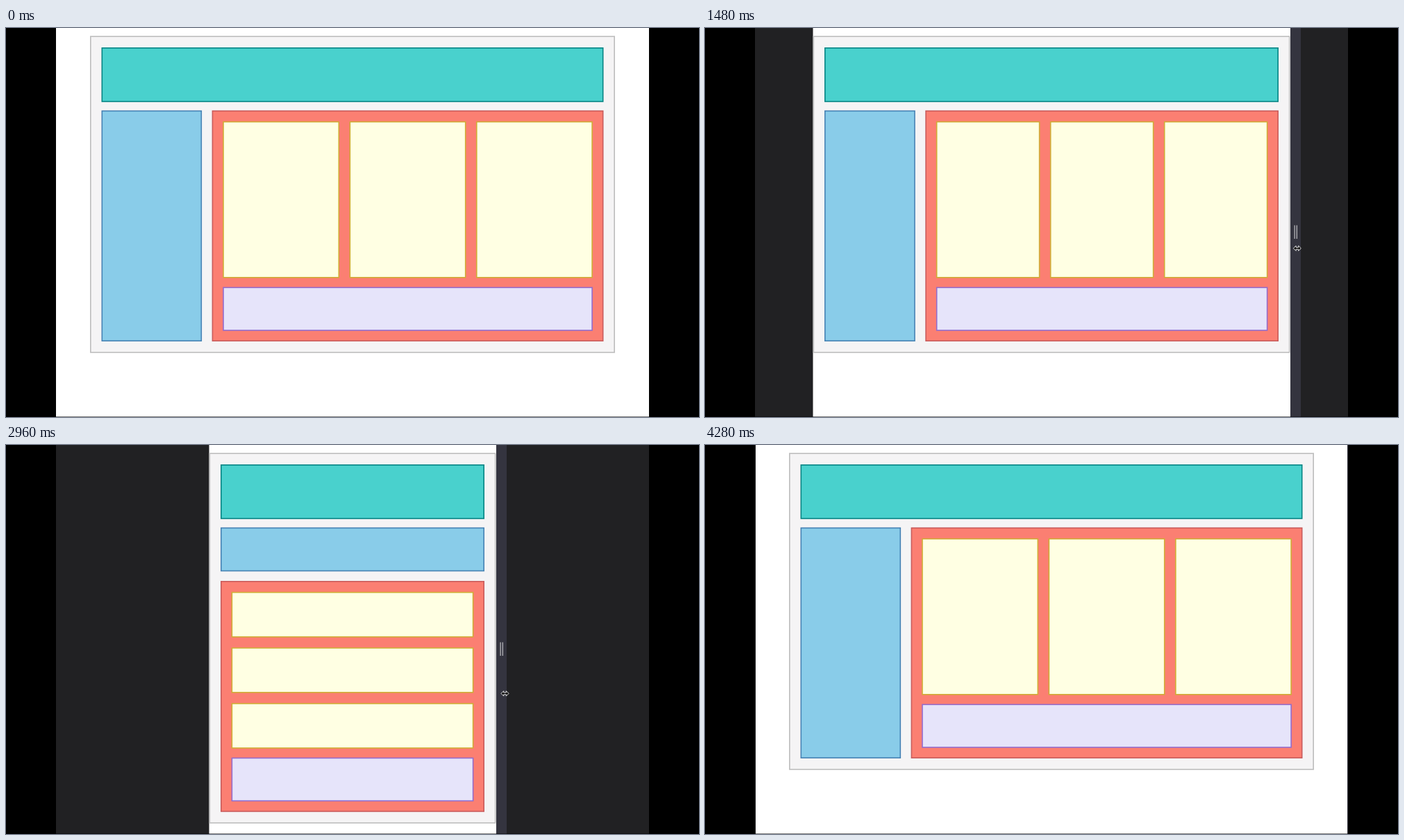
These frames come from a looping animation (998x561 px, 4320 ms). An HTML page with a canvas:

```html
<!DOCTYPE html>
<html lang="en">
<head>
<meta charset="utf-8">
<title>Responsive layout</title>
<style>
  html, body { margin: 0; width: 100%; height: 100%; overflow: hidden; background: #000; }
  canvas { display: block; }
</style>
</head>
<body>
<canvas id="stage" width="998" height="561"></canvas>
<script>
const ctx = document.getElementById('stage').getContext('2d');
const LOOP = 4320, STEP = 40, WIDTH = 998, HEIGHT = 561;
const CLIP_LEFT = 72, CLIP_RIGHT = WIDTH - CLIP_LEFT;
const BORDER = 1.6, PAD = 16.5, MAIN_PAD = 15.6, GAP = 14.5;
const MAX_WIDTH = 756, STACK_WIDTH = 605, COLUMN_WIDTH = 472;

// Key points of the drag: time and left edge of the window
const DRAG = [[320, 72], [680, 84], [880, 106], [1480, 155.5], [2120, 243],
  [2800, 302], [2960, 292.5], [3640, 155.8], [4280, 73]];

// Smooth curve through the points, at rest at both ends
function curve(points, t) {
  const last = points.length - 1;
  if (t < points[0][0]) return points[0][1];
  if (t >= points[last][0]) return points[last][1];
  const tangent = i => i === 0 || i === last ? 0
    : (points[i + 1][1] - points[i - 1][1]) / (points[i + 1][0] - points[i - 1][0]);
  const i = points.findIndex(p => p[0] > t) - 1;
  const [t0, v0] = points[i], [t1, v1] = points[i + 1];
  const span = t1 - t0, u = (t - t0) / span, w = 1 - u;
  return v0 * w * w * (1 + 2 * u) + v1 * u * u * (3 - 2 * u)
    + span * u * w * (tangent(i) * w - tangent(i + 1) * u);
}

function fill(color, x0, y0, x1, y1) {
  ctx.fillStyle = color;
  ctx.fillRect(x0, y0, x1 - x0, y1 - y0);
}

function box(color, border, x0, y0, x1, y1) {
  fill(border, x0, y0, x1, y1);
  fill(color, x0 + BORDER, y0 + BORDER, x1 - BORDER, y1 - BORDER);
}

function drawCards(x0, y0, x1, y1, stacked) {
  const size = ((stacked ? y1 - y0 : x1 - x0) - 2 * GAP) / 3;
  for (let i = 0; i < 3; i++) {
    const at = i * (size + GAP);
    if (stacked) box('#ffffe3', '#d0ad36', x0, y0 + at, x1, y0 + at + size);
    else box('#ffffe3', '#d0ad36', x0 + at, y0, x0 + at + size, y1);
  }
}

function drawPage(left, right) {
  const width = WIDTH - 2 * left;
  const stacked = width < STACK_WIDTH;
  const shift = stacked ? 77.2 : 0;
  const x0 = Math.max(left, (WIDTH - MAX_WIDTH) / 2), x1 = WIDTH - x0;
  const in0 = x0 + PAD, in1 = x1 - PAD;
  const sideRight = stacked ? in1 : in0 + (in1 - in0) * 0.2;
  const main0 = stacked ? in0 : sideRight + GAP;
  const card0 = main0 + MAIN_PAD, card1 = in1 - MAIN_PAD;

  fill('#fff', left, 0, right, HEIGHT);
  box('#f5f4f5', '#bdbdbd', x0, 11.4, x1, 468.6 + shift);
  box('#49d1cd', '#068484', in0, 28, in1, 106.8);
  box('#89cce9', '#4682b4', in0, 118.8, sideRight, stacked ? 182.3 : 452);
  box('#fb7f72', '#c95c5c', main0, 118.8 + shift, in1, 452 + shift);
  drawCards(card0, 134.6 + shift, card1, 360.6 + shift, width < COLUMN_WIDTH);
  box('#e6e4fa', '#936ccc', card0, 373.5 + shift, card1, 436.8 + shift);
}

function drawHandle(right) {
  fill('#34343f', right, 0, right + 15, HEIGHT);
  for (const offset of [5.5, 8.7]) fill('#b4b4b8', right + offset, 284.5, right + offset + 1.3, 304);
}

function drawCursor(x, y) {
  ctx.save();
  ctx.translate(x, y);
  ctx.beginPath();
  for (const side of [1, -1]) {
    ctx.lineTo(-1.8 * side, -1.4 * side);
    ctx.lineTo(1.8 * side, -1.4 * side);
    ctx.lineTo(1.8 * side, -3.7 * side);
    ctx.lineTo(5.5 * side, 0);
    ctx.lineTo(1.8 * side, 3.7 * side);
  }
  ctx.closePath();
  ctx.fillStyle = '#111';
  ctx.fill();
  ctx.strokeStyle = '#e4e4e4';
  ctx.stroke();
  ctx.restore();
}

function draw(t) {
  const left = curve(DRAG, t), right = Math.ceil(WIDTH - left);
  fill('#000', 0, 0, WIDTH, HEIGHT);
  ctx.save();
  ctx.beginPath();
  ctx.rect(CLIP_LEFT, 0, CLIP_RIGHT - CLIP_LEFT, HEIGHT);
  ctx.clip();
  fill('#212123', CLIP_LEFT, 0, CLIP_RIGHT, HEIGHT);
  drawPage(left, right);
  drawHandle(right);
  // The pointer drifts down and slightly away from the handle
  drawCursor(right + 7.2 + t * 0.0018, 277 + t * 0.0275);
  fill('rgba(0,0,0,.5)', CLIP_LEFT, HEIGHT - 1, CLIP_RIGHT, HEIGHT);
  ctx.restore();
}

const start = performance.now();
function tick() {
  const t = (performance.now() - start) % LOOP;
  draw(Math.floor(t / STEP) * STEP);
  requestAnimationFrame(tick);
}
tick();
</script>
</body>
</html>
```
